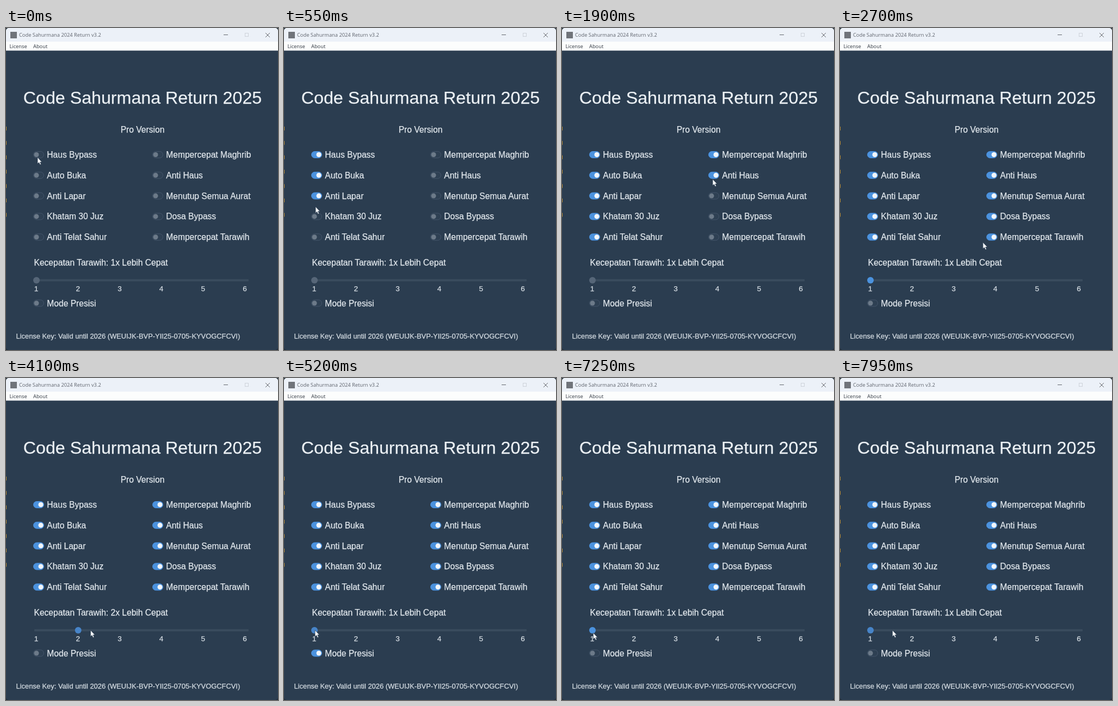
Recreate the animation shown at these times as an HTML page. Size 500 by 591 pixels, loop 8 s.

```html
<!DOCTYPE html>
<html lang="id">
<head>
<meta charset="utf-8">
<title>Code Sahurmana Return</title>
<style>
  html, body { margin: 0; width: 100%; height: 100%; overflow: hidden; background: #1f2a36; }
  svg { display: block; width: 100vw; height: 100vh; border-radius: 5px; }
  text { font-family: "Liberation Sans", Arial, sans-serif; font-size: 15.6px; fill: #e3e9ee; stroke: #e3e9ee; stroke-width: .25px; }
  .heading { font-size: 32.2px; fill: #edf2f6; }
  .mid { text-anchor: middle; }
  .tick { font-size: 13.5px; fill: #d3dae1; }
  .key { font-size: 12.9px; fill: #d0d8df; }
  .chrome { font-family: "Open Sans", sans-serif; font-size: 9.3px; fill: #5f646d; stroke: none; }
  .menu { fill: #303740; }
  .track { fill: #2e4053; stroke: #44556a; }
  .dot { fill: #6c7a89; }
  .on .track { fill: #4b92de; stroke: #4b92de; }
  .on .dot { fill: #f2f6fa; transform: translateX(8px); }
</style>
</head>
<body>
<svg viewBox="0 0 500 591">
  <rect width="500" height="591" fill="#2b3d50"/>
  <rect width="500" height="26" fill="#ecf1f8"/>
  <rect y="25" width="500" height="16.5" fill="#fcfdfd"/>
  <rect x="8" y="7" width="12" height="12" fill="#70747a"/>
  <text class="chrome" x="24" y="16">Code Sahurmana 2024 Return v3.2</text>
  <text class="chrome menu" x="6.5" y="37">License</text>
  <text class="chrome menu" x="50" y="37">About</text>
  <g fill="none" stroke="#62666d">
    <path d="M400 12.5h8"/>
    <rect x="439.5" y="9.5" width="6" height="6" stroke="#cdd2da"/>
    <path d="M477 9l8 8m0-8l-8 8"/>
  </g>
  <path d="M.5 181V348" stroke="#b98b35" stroke-dasharray="7 19.4"/>

  <text class="heading mid" x="251" y="139">Code Sahurmana Return 2025</text>
  <text class="mid" x="251" y="192">Pro Version</text>
  <g id="switches"></g>

  <text id="speed" x="51.5" y="436"></text>
  <rect x="52" y="461" width="394" height="4" rx="1" fill="#394b5d"/>
  <g id="ticks"></g>
  <circle id="knob" cy="463" r="6"/>
  <text class="key" x="18.5" y="570">License Key: Valid until 2026 (WEUIJK-BVP-YII25-0705-KYVOGCFCVI)</text>
  <path id="cursor" d="M0 0V11.5L2.6 9.3L4.6 13.4L6.5 12.5L4.6 8.5H8Z" fill="#f6f9fb" stroke="#26364a" stroke-width=".6"/>
</svg>
<script>
const LOOP = 8000, DWELL = 60;
const SLIDER_X = 56, SLIDER_Y = 463, STEP = 76.7;
const PRECISE_ON = 4750, PRECISE_OFF = 6450;
const columns = [
  { x: 50, from: 60, to: 840,
    labels: ["Haus Bypass", "Auto Buka", "Anti Lapar", "Khatam 30 Juz", "Anti Telat Sahur"] },
  { x: 269, from: 1585, to: 2610,
    labels: ["Mempercepat Maghrib", "Anti Haus", "Menutup Semua Aurat", "Dosa Bypass", "Mempercepat Tarawih"] }
];
const byId = id => document.getElementById(id);
const lerp = (a, b, k) => a + (b - a) * k;
const rowY = row => 232.5 + row * 37.8;

function add(parent, tag, attrs, text = "") {
  const node = document.createElementNS("http://www.w3.org/2000/svg", tag);
  for (const name in attrs) node.setAttribute(name, attrs[name]);
  node.textContent = text;
  return parent.appendChild(node);
}

const switches = [];
function addSwitch(label, x, y, onAt, offAt = Infinity) {
  const node = add(byId("switches"), "g", { transform: `translate(${x} ${y})` });
  add(node, "rect", { class: "track", x: .5, y: -6, width: 19, height: 12, rx: 6 });
  add(node, "circle", { class: "dot", cx: 6, cy: 0, r: 4.5 });
  add(node, "text", { x: 25.3, y: 5.5 }, label);
  switches.push({ node, onAt, offAt });
}

// The cursor travels from stop to stop and rests briefly at each one.
const stops = [];
const visit = (time, [x, y]) => stops.push({ time, x, y });
const onSlider = value => [SLIDER_X + 1 + (value - 1) * STEP, SLIDER_Y];
const onPrecise = [60, 503];

for (const { x, from, to, labels } of columns) {
  labels.forEach((label, row) => addSwitch(label, x, rowY(row), lerp(from, to, row / 4)));
  visit(from, [x + 8, rowY(0) + 5]);
  visit(to, [x + 8, rowY(4) + 5]);
}
addSwitch("Mode Presisi", 50, 505, PRECISE_ON, PRECISE_OFF);
visit(3150, onSlider(1));
visit(3650, onSlider(4.3));
visit(4350, onSlider(1));
visit(PRECISE_ON, onPrecise);
visit(5150, onSlider(1));
visit(5650, onSlider(3.2));
visit(6100, onSlider(1));
visit(PRECISE_OFF, onPrecise);
visit(7350, onSlider(1));
visit(LOOP, onSlider(1.56));

for (let n = 1; n <= 6; n++)
  add(byId("ticks"), "text", { class: "tick mid", x: 55.5 + (n - 1) * STEP, y: 483 }, n);

function cursorAt(t) {
  const i = Math.max(1, stops.findIndex(stop => stop.time > t));
  const a = stops[i - 1], b = stops[i];
  const k = Math.max(0, (t - a.time - DWELL) / (b.time - a.time - DWELL));
  return [lerp(a.x, b.x, k), lerp(a.y, b.y, k)];
}

function draw(t) {
  const [x, y] = cursorAt(t);
  for (const { node, onAt, offAt } of switches)
    node.classList.toggle("on", t >= onAt && t < offAt);

  const dragging = y === SLIDER_Y;
  const precise = t >= PRECISE_ON && t < PRECISE_OFF;
  const raw = dragging ? Math.max(1, 1 + (x - SLIDER_X - 1) / STEP) : 1;
  const value = precise ? raw : Math.floor(raw);
  byId("speed").textContent = `Kecepatan Tarawih: ${Number(value.toFixed(1))}x Lebih Cepat`;

  const knob = byId("knob");
  knob.setAttribute("cx", SLIDER_X + (value - 1) * STEP);
  knob.setAttribute("fill", t < columns[1].to ? "#566678" : dragging ? "#4784c8" : "#4b92de");
  byId("cursor").setAttribute("transform", `translate(${x} ${y})`);
}

const start = performance.now();
function tick() {
  draw((performance.now() - start) % LOOP);
  requestAnimationFrame(tick);
}
tick();
</script>
</body>
</html>
```
